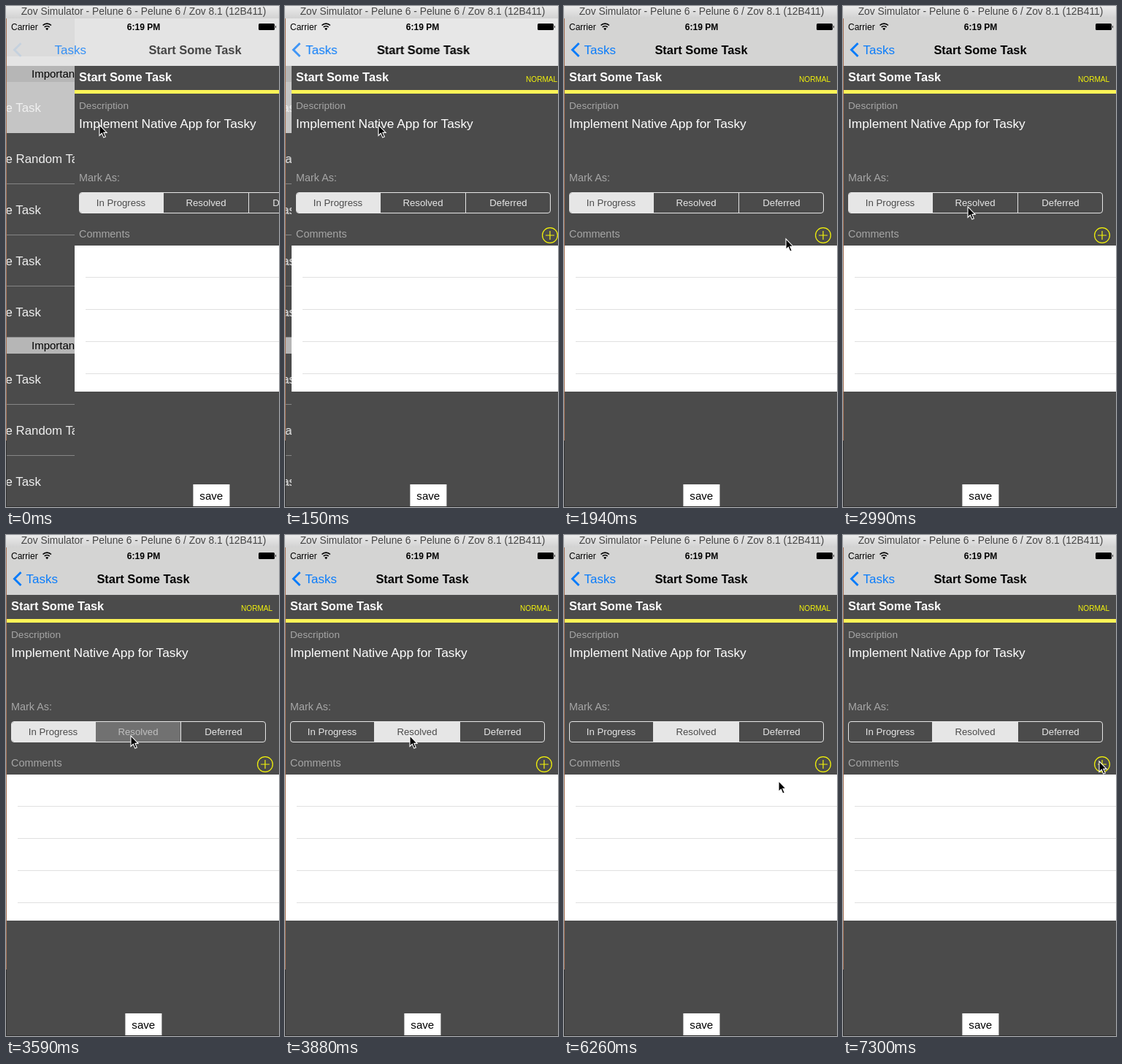
An HTML page for the animation above (8 s loop, 374 by 686 pixels).

```html
<!DOCTYPE html>
<html lang="en">
<head>
<meta charset="utf-8">
<title>Task detail</title>
<style>
  html, body { margin: 0; width: 100%; height: 100%; overflow: hidden; background: #4b4b4b; }
  svg { display: block; width: 374px; height: 686px; font-family: "Liberation Sans", Arial, sans-serif; }
  .bold { font-weight: bold; font-size: 16.4px; }
  .label { fill: #a6a6a6; font-size: 14.4px; }
  .body { fill: #fff; font-size: 17.3px; }
  .mid { text-anchor: middle; }
  .seg { fill: #e6e6e6; font-size: 13.2px; text-anchor: middle; }
  .on .seg { fill: #4b4b4b; }

  .list, .panel, .bar, .shade, .title, .back, .chevron, .cursor, .first, .second {
    animation: 8s step-end infinite;
  }
  .list { animation-name: list; }
  .panel { animation-name: panel; }
  .bar { animation-name: bar; }
  .shade { animation-name: shade; }
  .title { animation-name: title; }
  .back { animation-name: back; }
  .chevron { animation-name: chevron; }
  .first { animation-name: first; }
  .second { animation-name: second; }
  .cursor { animation-name: cursor; }

  @keyframes list {
    0% { transform: none; }
    1.875% { transform: translateX(-25.5px); }
    3.75%, 100% { transform: translateX(-28px); }
  }
  @keyframes panel {
    0% { transform: translateX(93px); }
    1.875% { transform: translateX(8px); }
    3.75% { transform: translateX(1px); }
    5.625%, 100% { transform: none; }
  }
  @keyframes bar {
    0% { fill: #e4e4e4; }
    1.875% { fill: #e7e7e7; }
    3.75% { fill: #dadad9; }
    5.625%, 100% { fill: #d4d4d3; }
  }
  @keyframes shade {
    0% { opacity: .04; }
    1.875%, 100% { opacity: 0; }
  }
  @keyframes title {
    0% { transform: translateX(71px); opacity: .7; }
    1.875% { transform: translateX(1.5px); opacity: 1; }
    3.75%, 100% { transform: none; opacity: 1; }
  }
  @keyframes back {
    0% { transform: translateX(39px); opacity: .8; }
    1.875% { transform: translateX(.7px); opacity: 1; }
    3.75%, 100% { transform: none; opacity: 1; }
  }
  @keyframes chevron {
    0% { opacity: .1; }
    1.875% { opacity: .75; }
    3.75%, 100% { opacity: 1; }
  }
  @keyframes first {
    0% { opacity: 1; }
    46.75% { opacity: .4; }
    48.5%, 100% { opacity: 0; }
  }
  @keyframes second {
    0% { opacity: 0; }
    44.875% { opacity: .25; }
    46.75% { opacity: .65; }
    48.5%, 100% { opacity: 1; }
  }
  @keyframes cursor {
    0% { transform: translate(126px, 162px); }
    13.125% { transform: translate(126px, 166px); }
    15% { transform: translate(150px, 202px); }
    16.875% { transform: translate(208px, 284px); }
    18.75% { transform: translate(242px, 325px); }
    22.375% { transform: translate(258px, 324px); }
    24.25% { transform: translate(302px, 318px); }
    26.125% { transform: translate(341px, 313px); }
    28% { transform: translate(351px, 312px); }
    33.625% { transform: translate(300px, 302px); }
    35.5% { transform: translate(205px, 282px); }
    37.375% { transform: translate(169px, 274px); }
    50.375% { transform: translate(196px, 273px); }
    52.125% { transform: translate(272px, 268px); }
    54% { transform: translate(311px, 265px); opacity: 1; }
    59.625% { transform: translate(311px, 265px); opacity: 0; }
    63.375% { transform: translate(343px, 103px); opacity: 1; }
    65.25% { transform: translate(338px, 102px); }
    70.875% { transform: translate(331px, 124px); }
    72.75% { transform: translate(311px, 182px); }
    74.625% { transform: translate(292px, 244px); }
    76.5% { transform: translate(284px, 296px); }
    78.25% { transform: translate(292px, 336px); }
    80% { transform: translate(316px, 360px); }
    81.875% { transform: translate(344px, 369px); }
    83.75% { transform: translate(360px, 370px); }
    85.625% { transform: translate(362px, 362px); }
    87.5% { transform: translate(359px, 340px); }
    89.375% { transform: translate(353px, 318px); }
    91.25%, 100% { transform: translate(349px, 309px); }
  }
</style>
</head>
<body>
<svg viewBox="0 0 374 686">
  <defs>
    <linearGradient id="chrome" x2="0" y2="1">
      <stop stop-color="#ebebeb"/><stop offset="1" stop-color="#d2d2d2"/>
    </linearGradient>
  </defs>
  <rect width="374" height="686" fill="#4b4b4b"/>

  <g class="list">
    <g fill="#b6b6b6">
      <path d="M0 82h140v22H0zM0 454h140v22H0z"/>
      <path d="M0 104h140v70H0z" fill="#c5c5c5"/>
    </g>
    <path d="M0 243.5h140M0 313.5h140M0 383.5h140M0 453.5h140M0 545.5h140M0 615.5h140" stroke="#858585"/>
    <g font-size="15"><text x="35" y="98">Important</text><text x="35" y="470">Important</text></g>
    <g id="rows" font-size="16.8" fill="#f0f0f0"></g>
  </g>

  <g class="panel">
    <rect x="1" y="82" width="374" height="604" fill="#4b4b4b"/>
    <text class="bold" x="7" y="103" fill="#fff">Start Some Task</text>
    <text x="322" y="104" font-size="10.1" fill="#f4f40a">NORMAL</text>
    <rect x="1" y="115" width="374" height="5" fill="#fdf457"/>
    <text class="label" x="7" y="141" style="font-size:13.6px">Description</text>
    <text class="body" x="7" y="167">Implement Native App for Tasky</text>
    <text class="label" x="7" y="240">Mark As:</text>
    <text class="label" x="7" y="317">Comments</text>

    <g class="seg"><text x="64.5" y="274">In Progress</text><text x="181" y="274">Resolved</text><text x="298" y="274">Deferred</text></g>
    <g class="on">
      <g class="first">
        <path d="M123 256H11a3 3 0 0 0-3 3v21a3 3 0 0 0 3 3h112z" fill="#e6e6e6"/>
        <text class="seg" x="64.5" y="274">In Progress</text>
      </g>
      <g class="second">
        <path d="M122 256h118v27H122z" fill="#e6e6e6"/>
        <text class="seg" x="181" y="274">Resolved</text>
      </g>
    </g>
    <g fill="none" stroke="#e6e6e6">
      <rect x="7.5" y="255.5" width="348" height="28" rx="3.5"/>
      <path d="M122.5 256v27M239.5 256v27"/>
    </g>

    <g fill="none" stroke="#f4f40a" stroke-width="1.2">
      <circle cx="355" cy="314" r="10.4"/>
      <path d="M349 314h12M355 308v12"/>
    </g>
    <rect x="1" y="328" width="374" height="200" fill="#fff"/>
    <path d="M16 371.5h360M16 415.5h360M16 459.5h360M16 503.5h360" stroke="#e0e0e0"/>
    <rect x="163.4" y="655" width="50" height="30" fill="#fff"/>
    <text class="mid" x="188.3" y="676" font-size="15.1">save</text>
  </g>

  <rect class="bar" y="17" width="374" height="65"/>
  <rect class="shade" y="17" width="94" height="52"/>
  <rect width="374" height="17" fill="url(#chrome)"/>
  <text class="mid" x="188.5" y="12" font-size="13.8" fill="#454545">Zov Simulator - Pelune 6 - Pelune 6 / Zov 8.1 (12B411)</text>

  <text x="7" y="33" font-size="12">Carrier</text>
  <g fill="none" stroke="#000" stroke-width="1.7">
    <path d="M50.5 26.5a8 8 0 0 1 11.4 0M52.7 29a5 5 0 0 1 7 0"/>
    <path d="M56.2 33.2l-2-2.3a3 3 0 0 1 4 0z" fill="#000" stroke="none"/>
  </g>
  <text class="mid" x="188.5" y="33" font-size="12" font-weight="bold">6:19 PM</text>
  <rect x="346" y="24" width="22" height="9" rx="1.5"/>
  <path d="M369 26.5q2 2 0 4z"/>

  <path class="chevron" d="M20.5 51l-9 9 9 9" fill="none" stroke="#0a7cfa" stroke-width="3"/>
  <text class="back" x="27.5" y="66" font-size="17" fill="#0a7cfa">Tasks</text>
  <text class="title bold mid" x="188" y="66">Start Some Task</text>

  <path d="M.5 17v578" stroke="#a87458"/>
  <path d="M.5 595v91M0 685.5h374" stroke="#303030"/>

  <path class="cursor" d="M2 .8v14.6l3.3-3.1 2.5 5.8 2.5-1.1-2.5-5.6h4.3z" fill="#000" stroke="#fff" stroke-width="1.1"/>
</svg>
<script>
  const rows = document.getElementById("rows");
  [145, 215, 285, 355, 425, 517, 587, 657].forEach((y, i) => {
    const row = document.createElementNS(rows.namespaceURI, "text");
    row.setAttribute("x", -75);
    row.setAttribute("y", y);
    row.textContent = i === 1 || i === 6 ? "Start Some Random Task" : "Start Some Task";
    rows.append(row);
  });
</script>
</body>
</html>
```
